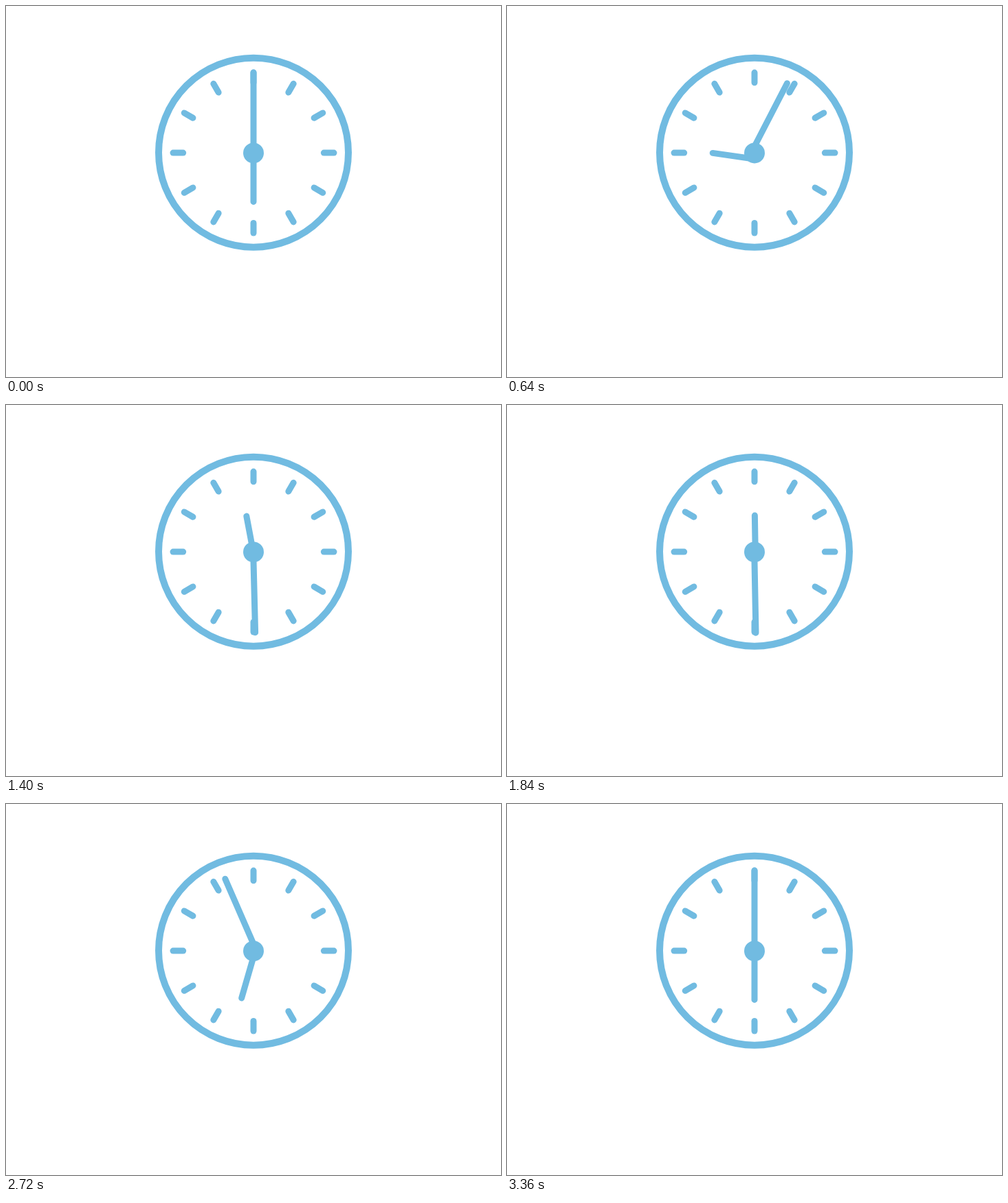
An HTML page with a canvas for the animation above (4240 ms loop, 720 by 541 pixels).

```html
<!DOCTYPE html>
<html lang="en">
<head>
<meta charset="utf-8">
<title>Clock</title>
<style>
  html, body { margin: 0; width: 100%; height: 100%; overflow: hidden; background: #fff; }
  canvas { display: block; }
</style>
</head>
<body>
<canvas id="stage" width="720" height="541"></canvas>
<script>
const ctx = document.getElementById('stage').getContext('2d');
const COLOR = '#71bbe1';
const STEP = 40, LOOP = 4240;
const CX = 360, CY = 214.1;

// Cubic Bezier easing through (0,0) and (1,1), solved by bisection
function bezier(x1, y1, x2, y2) {
  const at = (a, b, s) =>
    3 * s * (1 - s) ** 2 * a + 3 * s * s * (1 - s) * b + s ** 3;
  return x => {
    let lo = 0, hi = 1;
    for (let i = 0; i < 30; i++) {
      const mid = (lo + hi) / 2;
      if (at(x1, x2, mid) < x) lo = mid; else hi = mid;
    }
    return at(y1, y2, hi);
  };
}

// Each hand makes two half turns; the second one swings past and returns
const TURNS = [[0, 1680], [1720, 3360]];
const MINUTE = [bezier(0.877, 0, 0, 1.02), bezier(1, -0.13, 0.26, 1.746)];
const HOUR = [bezier(0.531, 0, 0, 0.7), bezier(0.8, -0.12, 0.3, 1.83)];

// Number of half turns made, and the way there (0) and back (1 to 0)
function pose(eases, t) {
  const [a, b] = TURNS.map(([from, to], i) => {
    const x = Math.min(1, Math.max(0, (t - from) / (to - from)));
    return x > 0 && x < 1 ? eases[i](x) : x;
  });
  return { deg: 180 * (a + b), shift: a - b };
}

function ray(x, y, deg, from, to) {
  const a = deg * Math.PI / 180, sx = Math.sin(a), sy = -Math.cos(a);
  ctx.beginPath();
  ctx.moveTo(x + sx * from, y + sy * from);
  ctx.lineTo(x + sx * to, y + sy * to);
  ctx.stroke();
}

function drawFace() {
  ctx.lineWidth = 10;
  ctx.beginPath();
  ctx.arc(CX, 213.7, 138, 0, Math.PI * 2);
  ctx.stroke();
  ctx.lineWidth = 9;
  for (let i = 0; i < 12; i++) {
    const inset = i % 3 ? 0.6 : 0;
    ray(CX, CY, i * 30, 102.3 - inset, 117 - inset);
  }
}

// The pivots slide along with the turns
function drawHands(t) {
  const m = pose(MINUTE, t), h = pose(HOUR, t);
  ray(CX, 200.5 + 28 * m.shift, m.deg, 0, 103.5);
  ray(CX + 1.4 * h.shift, 223.2, 180 + h.deg, 0, 62.2);
  ctx.beginPath();
  ctx.arc(CX, 214.4, 15, 0, Math.PI * 2);
  ctx.fill();
}

function draw(t) {
  ctx.clearRect(0, 0, 720, 541);
  ctx.fillStyle = ctx.strokeStyle = COLOR;
  ctx.lineCap = 'round';
  drawFace();
  drawHands(t);
}

const start = performance.now();
function tick(now) {
  const t = Math.max(0, now - start) % LOOP;
  draw(Math.floor(t / STEP) * STEP);
  requestAnimationFrame(tick);
}
draw(0);
requestAnimationFrame(tick);
</script>
</body>
</html>
```
